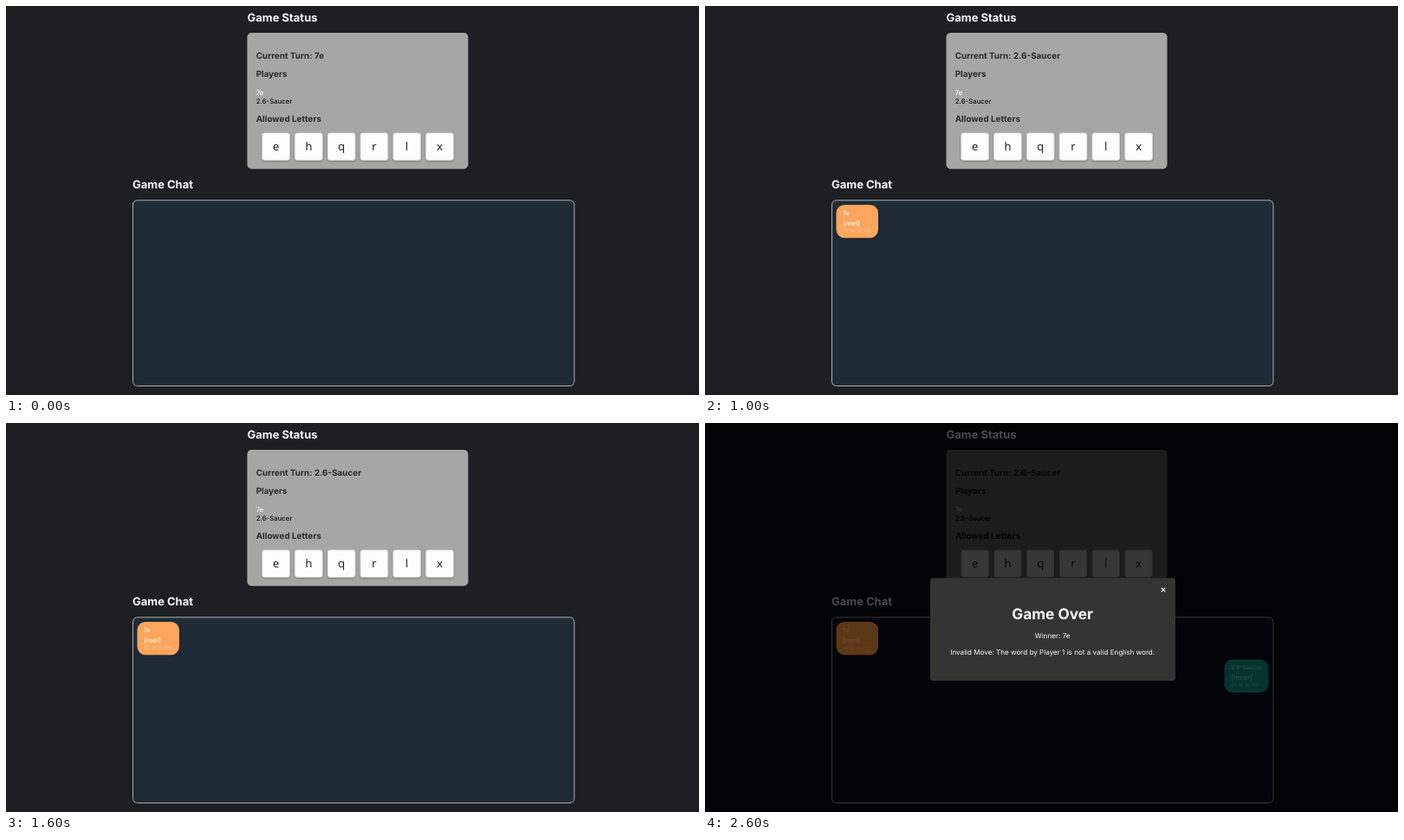
Recreate the animation shown at these times as an HTML page. Size 800 px wide and 450 px high, loop 3000 ms.

```html
<!DOCTYPE html>
<html lang="en">
<head>
<meta charset="utf-8">
<title>Word game</title>
<style>
  html, body { margin: 0; width: 100%; height: 100%; overflow: hidden; background: #1e1f22; }
  svg {
    display: block; width: 800px; height: 450px;
    font-family: Inter, "Open Sans", sans-serif; text-rendering: geometricPrecision;
    --page: #1e1f22; --title: #f6f7f7; --card: #a5a7a4; --ink: #292b29; --name: #111211;
    --active: #f8f9f8; --key: #fcfdfb; --keyEdge: #dcdedb; --keyInk: #20211f;
    --chat: #1f2b36; --line: #a9adaf; --first: #fba55d; --firstInk: #fff4e8; --firstTime: #fcc797;
  }
  svg.over {
    --page: #020305; --title: #484a4a; --card: #1d1e1b; --ink: #050605; --name: #020302;
    --active: #343532; --key: #363735; --keyEdge: #2c2d2b; --keyInk: #080908;
    --chat: #030509; --line: #33373a; --first: #5d3719; --firstInk: #754a29; --firstTime: #6a4222;
  }
  .title { font-weight: 700; font-size: 13px; fill: var(--title); }
  .label { font-weight: 700; font-size: 9.9px; fill: var(--ink); }
  .name { font-weight: 500; font-size: 7.8px; fill: var(--name); }
  .key { font: 13px "Noto Sans", "Open Sans", sans-serif; fill: var(--keyInk); text-anchor: middle; }
  .author { font-weight: 600; font-size: 6.6px; }
  .word { font-weight: 500; font-size: 7.8px; }
  .time { font-size: 5.2px; }
  .modal text { fill: #f7f8f6; text-anchor: middle; font-size: 8.1px; }
  .modal .heading { font-weight: 700; font-size: 17.3px; }
</style>
</head>
<body>
<svg id="stage" viewBox="0 0 800 450">
  <defs>
    <filter id="shadow" x="-20%" y="-20%" width="140%" height="150%">
      <feDropShadow dx="0" dy="1" stdDeviation="1.3" flood-opacity=".3"/>
    </filter>
  </defs>
  <rect width="800" height="450" fill="var(--page)"/>

  <text class="title" x="278.5" y="18">Game Status</text>
  <rect x="278.5" y="31" width="255" height="157.5" rx="5" fill="var(--card)" filter="url(#shadow)"/>
  <text class="label" x="288.7" y="61">Current Turn: <tspan id="turn"></tspan></text>
  <text class="label" x="288.7" y="82.3">Players</text>
  <text class="name" x="288.7" y="102.7" style="fill:var(--active)" data-player="0"></text>
  <text class="name" x="288.7" y="112.8" data-player="1"></text>
  <text class="label" x="288.7" y="134.3">Allowed Letters</text>
  <g id="keys"></g>

  <text class="title" x="146" y="211.3">Game Chat</text>
  <rect x="146.5" y="224.8" width="509.5" height="214.7" rx="5" fill="var(--chat)" stroke="var(--line)"/>

  <g id="firstMove" fill="var(--firstInk)">
    <rect x="151.5" y="230" width="48.5" height="38.3" rx="9.5" fill="var(--first)" filter="url(#shadow)"/>
    <text class="author" x="159" y="241.9" data-player="0"></text>
    <text class="word" x="159" y="254">[reel]</text>
    <text class="time" x="159" y="261.8" fill="var(--firstTime)">06:46:32 PM</text>
  </g>

  <g id="ending">
    <g fill="#1c524c">
      <rect x="599.5" y="273.6" width="51" height="38.3" rx="9.5" fill="#07332f"/>
      <text class="author" x="607" y="285.3" data-player="1"></text>
      <text class="word" x="607" y="297.4">[rexer]</text>
      <text class="time" x="607" y="305.2" fill="#16453f">06:46:35 PM</text>
    </g>
    <g class="modal">
      <rect x="260" y="179.2" width="283" height="119" rx="3.5" fill="#333532"/>
      <path d="M526.7 190.7l4.6 4.6m0-4.6l-4.6 4.6" stroke="#f7f8f6" stroke-width="1.2"/>
      <text class="heading" x="401.2" y="227">Game Over</text>
      <text x="401.2" y="249.4">Winner: <tspan data-player="0"></tspan></text>
      <text x="401.2" y="268">Invalid Move: The word by Player 1 is not a valid English word.</text>
    </g>
  </g>
</svg>
<script>
  const players = ["7e", "2.6-Saucer"];
  const byId = id => document.getElementById(id);
  const [stage, turn, firstMove, ending] = ["stage", "turn", "firstMove", "ending"].map(byId);

  for (const el of document.querySelectorAll("[data-player]"))
    el.textContent = players[el.dataset.player];

  byId("keys").innerHTML = [..."ehqrlx"].map((letter, i) => {
    const x = 295.8 + i * 37.8;
    return `<rect x="${x}" y="147" width="31.6" height="31.3" rx="2.5" fill="var(--key)"
      stroke="var(--keyEdge)" stroke-width=".8" filter="url(#shadow)"/>
      <text class="key" x="${x + 15.8}" y="167">${letter}</text>`;
  }).join("");

  function draw() {
    const step = Math.floor(performance.now() / 1000) % 3;
    turn.textContent = players[Math.min(step, 1)];
    firstMove.style.display = step > 0 ? "" : "none";
    ending.style.display = step > 1 ? "" : "none";
    stage.classList.toggle("over", step > 1);
    requestAnimationFrame(draw);
  }
  draw();
</script>
</body>
</html>
```
